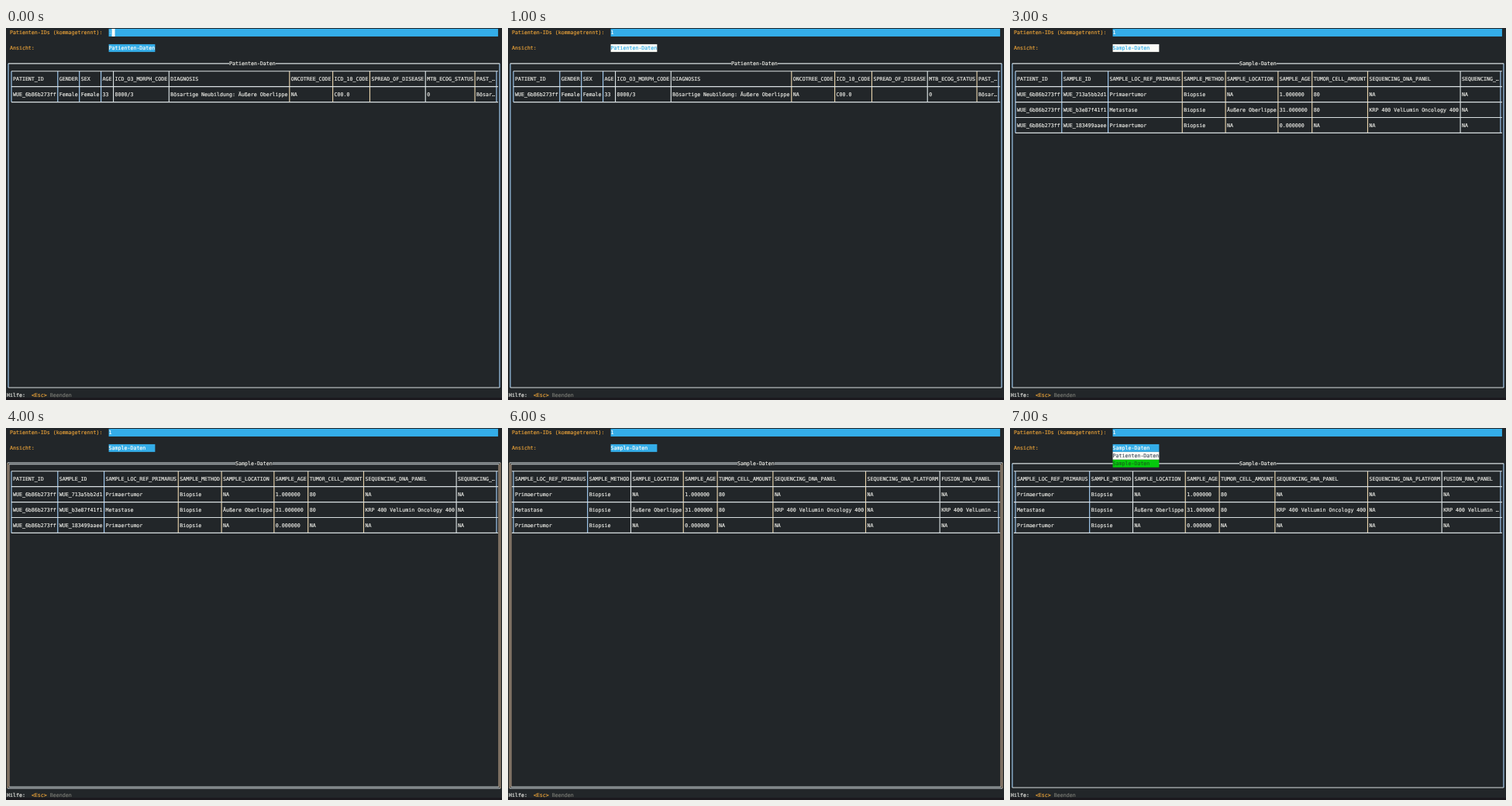
An HTML page that plays this animation: 640x480 px, repeating every 8 s.

```html
<!DOCTYPE html>
<html lang="de">
<head>
<meta charset="utf-8">
<title>Patienten-Daten</title>
<style>
  html, body { margin: 0; width: 100%; height: 100%; overflow: hidden; background: #222629; }
  svg { display: block; width: 640px; height: 480px; }
  text {
    font: 6.623px "DejaVu Sans Mono", monospace;
    white-space: pre;
    text-rendering: geometricPrecision;
    stroke-width: .18px;
  }
  .scene { visibility: hidden; animation: show 8s step-end infinite; }
  @keyframes show {
    0% { visibility: visible; }
    12.5%, 100% { visibility: hidden; }
  }
</style>
</head>
<body>
<svg id="stage" viewBox="0 0 640 480"></svg>
<script>
const CELL_W = 3.987, CELL_H = 9.957, LAST_COL = 158;
const INK = '#e6e6e1', ORANGE = '#e09c38', GREY = '#74756f', BLUE = '#34ade8',
      WHITE = '#fdfdf8', GREEN = '#06c90d', LINE = '#d9e0e2',
      COOL = '#a3cdf3', WARM = '#e6d2ac', TAN = '#d8b99a';

const left = col => 1 + col * CELL_W;
const top_ = row => 1 + row * CELL_H;
const midX = col => left(col + .5);
const midY = row => top_(row + .5);

function add(parent, tag, attrs, content = '') {
  const node = document.createElementNS('http://www.w3.org/2000/svg', tag);
  for (const key in attrs) node.setAttribute(key, attrs[key]);
  node.textContent = content;
  return parent.appendChild(node);
}

const fill = (g, col, row, cols, color) =>
  add(g, 'rect', { x: left(col), y: top_(row), width: cols * CELL_W, height: CELL_H, fill: color });

const write = (g, col, row, text, color = INK) =>
  add(g, 'text', { x: left(col), y: midY(row) + 2.4, fill: color, stroke: color }, text);

const rule = (g, x1, y1, x2, y2, color = LINE, width = 1.15) =>
  add(g, 'line', { x1, y1, x2, y2, stroke: color, 'stroke-width': width });

// Subpixel fringes tint the vertical lines depending on where they fall.
function tint(x) {
  if (x < 130 || x > 620) return COOL;
  return x < 215 || (x > 535 && x < 600) ? LINE : WARM;
}

const patients = [
  ['PATIENT_ID', 'WUE_6b86b273ff'],
  ['GENDER', 'Female'],
  ['SEX', 'Female'],
  ['AGE', '33'],
  ['ICD_O3_MORPH_CODE', '8000/3'],
  ['DIAGNOSIS', 'Bösartige Neubildung: Äußere Oberlippe'],
  ['ONCOTREE_CODE', 'NA'],
  ['ICD_10_CODE', 'C00.0'],
  ['SPREAD_OF_DISEASE', ''],
  ['MTB_ECOG_STATUS', '0'],
  ['PAST_DISEASES', 'Bösartige Neubildung']
];

const panel = 'KRP 400 VelLumin Oncology 400';
const samples = [
  ['PATIENT_ID', 'WUE_6b86b273ff', 'WUE_6b86b273ff', 'WUE_6b86b273ff'],
  ['SAMPLE_ID', 'WUE_713a5bb2d1', 'WUE_b3e87f41f1', 'WUE_183499aaee'],
  ['SAMPLE_LOC_REF_PRIMARUS', 'Primaertumor', 'Metastase', 'Primaertumor'],
  ['SAMPLE_METHOD', 'Biopsie', 'Biopsie', 'Biopsie'],
  ['SAMPLE_LOCATION', 'NA', 'Äußere Oberlippe', 'NA'],
  ['SAMPLE_AGE', '1.000000', '31.000000', '0.000000'],
  ['TUMOR_CELL_AMOUNT', '80', '80', 'NA'],
  ['SEQUENCING_DNA_PANEL', 'NA', panel, 'NA'],
  ['SEQUENCING_DNA_PLATFORM', 'NA', 'NA', 'NA'],
  ['FUSION_RNA_PANEL', 'NA', panel, 'NA']
];

const views = {
  'Patienten-Daten': patients,
  'Sample-Daten': samples
};

function drawFrame(g, title, focused) {
  const x1 = midX(0), x2 = midX(159), y1 = midY(4), y2 = midY(46);
  const titleCol = Math.ceil((160 - title.length) / 2) - (title.length % 2);
  for (const d of focused ? [-.95, .95] : [0]) {
    const width = focused ? .95 : 1.15, side = focused ? TAN : COOL;
    rule(g, x1 + d, y1 + d, x1 + d, y2 - d, side, width);
    rule(g, x2 - d, y1 + d, x2 - d, y2 - d, side, width);
    rule(g, x1 + d, y2 - d, x2 - d, y2 - d, LINE, width);
    rule(g, x1 + d, y1 + d, left(titleCol), y1 + d, LINE, width);
    rule(g, left(titleCol + title.length), y1 + d, x2 - d, y1 + d, LINE, width);
  }
  write(g, titleCol, 4, title);
}

function drawTable(g, columns, offset) {
  const rows = columns[0].length, end = 5 + rows * 2;
  const start = offset ? left(1) : midX(1);
  const divider = col => rule(g, midX(col), midY(5), midX(col), midY(end), tint(midX(col)));

  let col = 1;
  for (const cells of columns.slice(offset)) {
    const room = LAST_COL - col - 1;
    if (room < 1) break;
    divider(col);
    cells.forEach((cell, i) => {
      const shown = cell.length > room ? cell.slice(0, room - 1) + '…' : cell;
      write(g, col + 1, 6 + i * 2, shown);
    });
    col += Math.max(...cells.map(cell => cell.length)) + 1;
  }
  divider(LAST_COL);
  for (let row = 5; row <= end; row += 2)
    rule(g, start, midY(row), left(LAST_COL + 1), midY(row));
}

function drawForm(g, view, focus) {
  write(g, 1, 0, 'Patienten-IDs (kommagetrennt):', ORANGE);
  fill(g, 33, 0, 126, BLUE);
  write(g, 33, 0, '1', focus === 'input' ? '#7cc8ee' : WHITE);
  if (focus === 'input') fill(g, 34, 0, 1, WHITE);

  const selected = focus === 'select';
  write(g, 1, 2, 'Ansicht:', ORANGE);
  fill(g, 33, 2, 15, selected ? WHITE : BLUE);
  write(g, 33, 2, view, selected ? BLUE : WHITE);

  if (focus === 'list') Object.keys(views).forEach((name, i) => {
    const current = name === view;
    fill(g, 33, 3 + i, 15, current ? GREEN : WHITE);
    write(g, 33, 3 + i, name, current ? '#17691c' : '#4b5565');
  });
}

function drawHelp(g) {
  write(g, 0, 47, 'Hilfe:');
  write(g, 8, 47, '<Esc>', ORANGE);
  write(g, 14, 47, 'Beenden', GREY);
}

// One scene per second: view, focused part, first visible column.
const scenes = [
  ['Patienten-Daten', 'input', 0],
  ['Patienten-Daten', 'select', 0],
  ['Patienten-Daten', 'list', 0],
  ['Sample-Daten', 'select', 0],
  ['Sample-Daten', 'table', 0],
  ['Sample-Daten', 'table', 1],
  ['Sample-Daten', 'table', 2],
  ['Sample-Daten', 'list', 2]
];

const stage = document.getElementById('stage');
add(stage, 'rect', { width: 640, height: 480, fill: '#222629' });
add(stage, 'rect', { y: 477, width: 640, height: 3, fill: '#1b191e' });
drawHelp(stage);
scenes.forEach(([view, focus, offset], i) => {
  const g = add(stage, 'g', { class: 'scene', style: `animation-delay: ${i ? i - scenes.length : 0}s` });
  drawFrame(g, view, focus === 'table');
  drawTable(g, views[view], offset);
  drawForm(g, view, focus);
});
</script>
</body>
</html>
```
